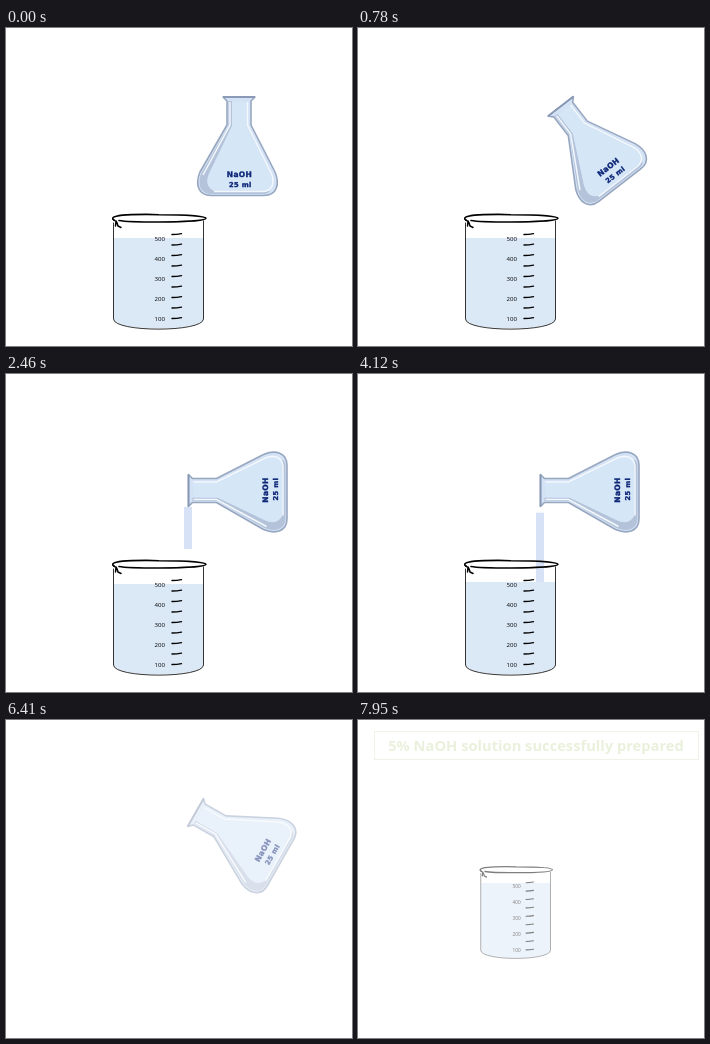
An HTML page that plays this animation: 346 by 318 pixels, repeating every 8 s.

```html
<!DOCTYPE html>
<html lang="en">
<head>
<meta charset="utf-8">
<title>Preparing a solution</title>
<style>
  html, body { margin: 0; width: 100%; height: 100%; overflow: hidden; background: #fff; }
  svg { display: block; width: 100%; height: 100%; }
  .label { font: 900 7.5px "DejaVu Sans", sans-serif; letter-spacing: .35px; fill: #0c2577;
           stroke: #0c2577; stroke-width: .35px; text-anchor: middle; }
  .scale { font: 6.1px "Open Sans", sans-serif; fill: #000; text-anchor: end; }
  .title { font: bold 14.7px "Open Sans", sans-serif; fill: #d4e2b8; text-anchor: middle; }
</style>
</head>
<body>
<svg viewBox="0 0 346 318">
  <rect id="stream" x="178" y="133" width="8" height="0" fill="#d7e2f6"/>

  <g id="beaker">
    <path id="liquid" fill="#dbe8f6"/>
    <g fill="none" stroke="#000" stroke-linecap="round">
      <path d="M107.5 195V291C108 304.500 197 304.500 197.5 291V193" stroke-width=".8"/>
      <path d="M108 192C98 185 150 186.500 153 186.700C180 186.700 200 188 200 190.300C200 193 175 194 153 194C135 194 118 193.500 113 192.500"
            stroke-width="1.6"/>
      <path d="M107 191.5L110 193.500L109.500 198M110 193Q111.500 195.500 112 198L115 199.5" stroke-width="1.5"/>
      <g id="ticks" stroke-width="1.4"></g>
    </g>
    <g id="numbers" class="scale"></g>
  </g>

  <g id="flask">
    <path d="M217 69H249L245 73V97L269 144C274 156 271 167.500 258 167.500H205C192 167.500 189 156 194 144L221 97V73Z"
          fill="#d3e2f4" stroke="#98a7c0" stroke-width="1.6" stroke-linejoin="round"/>
    <path d="M222.500 73H226V98L203 146Q198 158 208 163H258Q262 164 264 162Q263 166 257 166H206C194 166 191 156 195.500 145L222.500 98Z"
          fill="#b4c2da"/>
    <path d="M226 74V98L203 146Q198 159 209 162.500H256Q269 162 265 148L240.500 98V74Z" fill="#d5e6f7"/>
    <path d="M241.500 74V97L266 147Q270 161 258 163.500H208M224 74V97L197 147" fill="none"
          stroke="#f3f8fd" stroke-width="1.500"/>
    <path d="M217 69H249" stroke="#8797b4" stroke-width="1.8"/>
    <text class="label" x="233.500" y="148.800">NaOH</text>
    <text class="label" x="234.300" y="158.800" style="font-size:6.7px">25 ml</text>
  </g>

  <g id="title">
    <rect x="16.500" y="11.500" width="324" height="28" fill="none" stroke="#dfe8cf"/>
    <text class="title" x="178" y="31">5% NaOH solution successfully prepared</text>
  </g>
</svg>
<script>
const LOOP = 8000, STEP = 60;
const $ = id => document.getElementById(id);
const set = (id, attrs) => {
  for (const k in attrs) $(id).setAttribute(k, attrs[k]);
};

for (let i = 0; i < 9; i++) {
  const y = 206.5 + i * 10.500;
  $("ticks").innerHTML += `<path d="M166 ${y}Q171 ${y} 175.500 ${y - 0.9}"/>`;
}
for (let i = 0; i < 5; i++) {
  $("numbers").innerHTML += `<text x="159" y="${213 + i * 19.9}">${500 - i * 100}</text>`;
}

// Steps taken at time t when the first one falls on `first`
const steps = (t, first, count) =>
  Math.max(0, Math.min(count, Math.floor((t - first) / STEP) + 1));

// Speeds up over 13 steps, then runs at 3 px per step
const drain = n => n < 13 ? 1.5 * n * n / 13 : 3 * n - 19.5;

function streamFoot(t) {
  const n = steps(t, 2040, 12) - 1;
  if (n < 0) return 133;
  return n < 7 ? 134 + n * 5.9 : 175 + (n - 7) * 8.5;
}

function draw(t) {
  const out = steps(t, 6230, 8), back = steps(t, 7230, 13);

  const angle = -90 * steps(t, 60, 31) / 31 + 7.4 * out;
  set("flask", { transform: `rotate(${angle} 231.500 118)`, opacity: 1 - out / 8 });

  const level = t < 3230 ? 210 : t < 3760 ? 209 : t < 4600 ? 208 : 207;
  set("liquid", { d: `M108 ${level}H197V291C196.500 303.500 108.500 303.500 108 291Z` });

  const top = 133 + drain(steps(t, 3760, 30));
  const foot = Math.min(level, streamFoot(t));
  set("stream", { y: top, height: t < 5500 ? Math.max(0, foot - top) : 0 });

  set("beaker", {
    opacity: t < 6230 ? 1 : back / 26,
    transform: t < 6230 ? "" : "translate(158 149.500) scale(.775 .8) translate(-153 -190)"
  });
  set("title", { opacity: back / 26 });
}

function tick() {
  draw(performance.now() % LOOP);
  requestAnimationFrame(tick);
}
tick();
</script>
</body>
</html>
```
